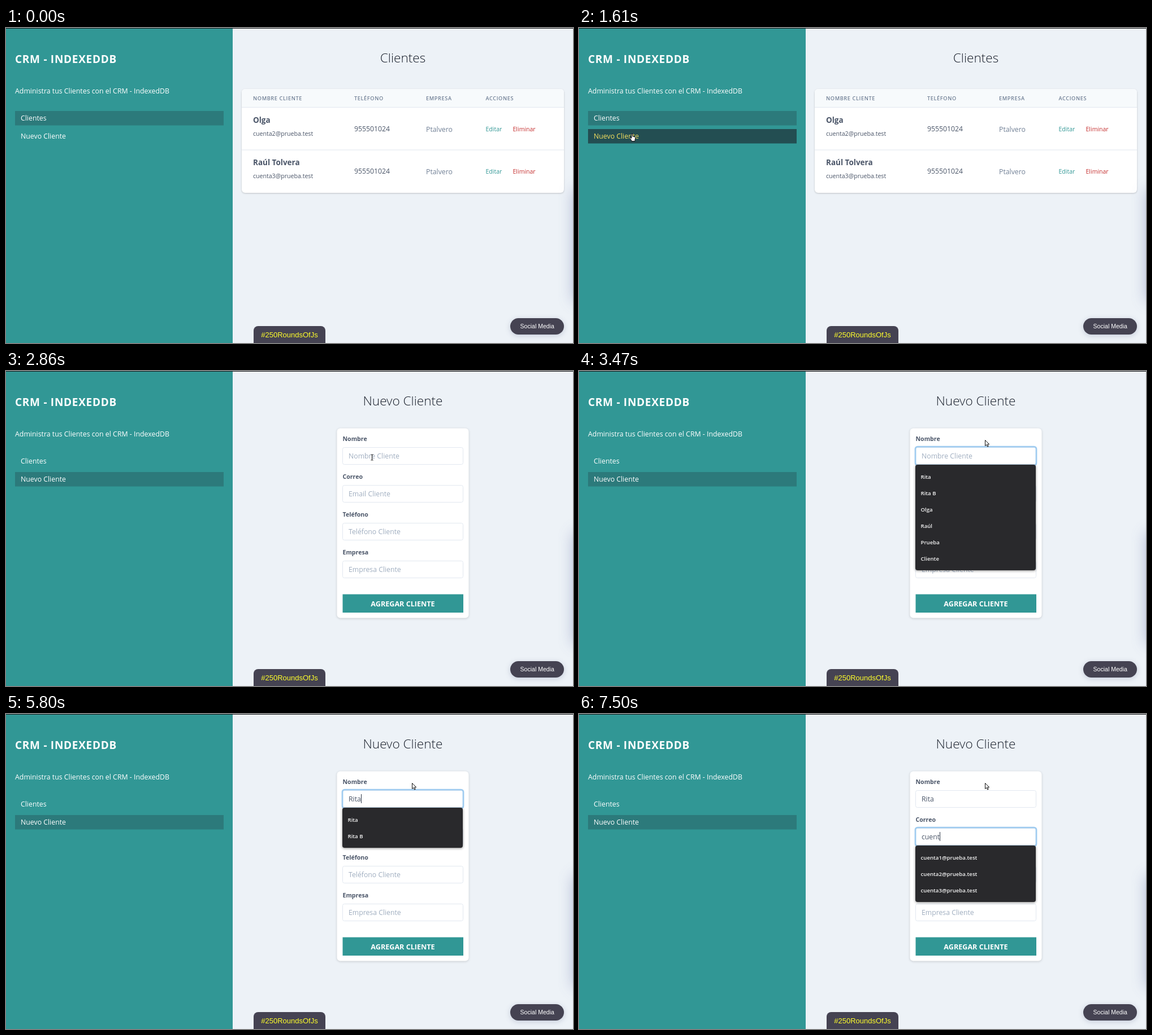
These frames come from a looping animation (1003 px wide and 558 px high, 8000 ms). An HTML page with a canvas:

```html
<!DOCTYPE html>
<html lang="es">
<head>
<meta charset="utf-8">
<title>CRM - IndexedDB</title>
<style>
  html, body { margin: 0; width: 100%; height: 100%; overflow: hidden; background: #edf2f7; }
  canvas { display: block; }
</style>
</head>
<body>
<canvas id="stage" width="1003" height="558"></canvas>
<script>
const ctx = document.getElementById('stage').getContext('2d');
const LOOP = 8000;
const SANS = '"Open Sans", "Noto Sans", sans-serif';
const ARIAL = '"Liberation Sans", Arial, sans-serif';
const TEAL = '#319795', TEAL_DARK = '#2c7a7b', TEAL_DEEP = '#234e52';
const INK = '#4a5568', GRAY = '#718096', PALE = '#a0aec0', LINE = '#e2e8f0', YELLOW = '#f6e05e';

const SITE = 'https://ptalverotila.github.io/CRM-Adm-practice/';
const FORM_OPENS = 2090;
const MENU = [
  { label: 'Clientes', y: 147, page: 'index.html' },
  { label: 'Nuevo Cliente', y: 179, page: 'nuevo-cliente.html' }
];
const CLIENTS = [
  { name: 'Olga', mail: 'cuenta2@prueba.test' },
  { name: 'Raúl Tolvera', mail: 'cuenta3@prueba.test' }
];
const FIELDS = [
  ['Nombre', 'Nombre Cliente'], ['Correo', 'Email Cliente'],
  ['Teléfono', 'Teléfono Cliente'], ['Empresa', 'Empresa Cliente']
];
const FIELD = { x: 595.5, y: 135, step: 67.1, w: 213, h: 31 };

const NAMES = ['Rita', 'Rita B', 'Olga', 'Raúl', 'Prueba', 'Cliente'];
const MAILS = [1, 2, 3, 4, 5, 6].map(n => (n < 4 ? 'cuenta' : 'cliente') + n + '@prueba.test');

// [time, field, typed text, suggestions, caret visible]
const TYPING = [
  [3010, 0, '', NAMES, true],
  [3470, 0, '', NAMES, false],
  [3780, 0, 'R', NAMES.slice(0, 2), true],
  [4010, 0, 'Ru', [], true],
  [4240, 0, 'Ru ', [], true],
  [4790, 0, 'Ru ', [], false],
  [5020, 0, 'R', NAMES.slice(0, 2), true],
  [5250, 0, 'Ri', NAMES.slice(0, 2), true],
  [5400, 0, 'Rit', NAMES.slice(0, 2), true],
  [5800, 0, 'Rita', NAMES.slice(0, 2), true],
  [6030, 1, '', [], true],
  [6580, 1, '', [], false],
  [6810, 1, 'c', MAILS, true],
  [7040, 1, 'cu', MAILS.slice(0, 3), true],
  [7190, 1, 'cue', MAILS.slice(0, 3), true],
  [7350, 1, 'cuen', MAILS.slice(0, 3), true],
  [7500, 1, 'cuent', MAILS.slice(0, 3), true]
];

// [time, x, y] of the pointer's hot spot
const PATH = [
  [450, 990, 552], [530, 977, 547], [680, 880, 520], [1070, 92, 297],
  [1220, 92, 270], [1376, 92, 200], [1610, 94, 187], [2000, 95, 188],
  [2090, 165, 184], [2240, 317, 164], [2860, 647, 153], [2930, 665, 146], [3090, 718, 122]
];
// [first, last, number of steps]
const BURSTS = [[450, 530, 2], [680, 1070, 6], [1220, 2000, 11], [2090, 2860, 11], [2930, 3090, 3]];

function stepTime(t) {
  let held = 0;
  for (const [from, to, count] of BURSTS) {
    if (t < from) break;
    const gap = (to - from) / (count - 1);
    held = from + gap * Math.min(count - 1, Math.floor((t - from + 5) / gap));
  }
  return held;
}

function pointerAt(t) {
  const s = stepTime(t);
  if (s < PATH[0][0]) return null;
  const next = PATH.findIndex(p => p[0] > s);
  if (next < 0) return { x: 718, y: 122 };
  const [t0, x0, y0] = PATH[next - 1], [t1, x1, y1] = PATH[next];
  const k = (s - t0) / (t1 - t0);
  return { x: Math.round(x0 + (x1 - x0) * k), y: Math.round(y0 + (y1 - y0) * k) };
}

function rect(x, y, w, h, color) {
  ctx.fillStyle = color;
  ctx.fillRect(x, y, w, h);
}

function box(x, y, w, h, radius, color) {
  ctx.beginPath();
  ctx.roundRect(x, y, w, h, radius);
  ctx.fillStyle = color;
  ctx.fill();
}

function outline(x, y, w, h, radius, color, width) {
  ctx.beginPath();
  ctx.roundRect(x, y, w, h, radius);
  ctx.strokeStyle = color;
  ctx.lineWidth = width;
  ctx.stroke();
}

function shadowed(color, blur, dy, draw) {
  ctx.save();
  ctx.shadowColor = color;
  ctx.shadowBlur = blur;
  ctx.shadowOffsetY = dy;
  draw();
  ctx.restore();
}

function text(str, x, y, size, color, { weight = 400, family = SANS, align = 'left', spacing = 0 } = {}) {
  ctx.font = `${weight} ${size}px ${family}`;
  ctx.letterSpacing = spacing + 'px';
  ctx.textAlign = align;
  ctx.fillStyle = color;
  ctx.fillText(str, x, y);
}

function drawSidebar(active, hovered) {
  rect(0, 0, 401, 558, TEAL);
  text('CRM - INDEXEDDB', 16, 61.5, 19, '#fff', { weight: 700, spacing: 0.72 });
  text('Administra tus Clientes con el CRM - IndexedDB', 16, 116, 12.35, '#fff');
  MENU.forEach((item, i) => {
    const over = i === hovered;
    if (over || i === active) rect(16, item.y, 369, 25.5, over && i === 1 ? TEAL_DEEP : TEAL_DARK);
    text(item.label, 26, item.y + 17.3, 12.3, over ? YELLOW : '#fff');
  });
}

function drawTitle(str) {
  text(str, 702, 61, 22.6, '#1a202c', { weight: 300, align: 'center' });
}

function drawClients() {
  drawTitle('Clientes');
  shadowed('rgba(0,0,0,0.2)', 3, 1, () => box(417, 108, 570, 184, 6, '#fff'));
  box(417, 108, 570, 33, [6, 6, 0, 0], '#f7fafc');
  rect(417, 140, 570, 1, LINE);
  rect(417, 215.5, 570, 1, LINE);
  const head = { weight: 600, spacing: 0.6 };
  [['NOMBRE CLIENTE', 437], ['TELÉFONO', 616], ['EMPRESA', 743], ['ACCIONES', 848.5]]
    .forEach(([label, x]) => text(label, x, 128, 9.2, GRAY, head));
  CLIENTS.forEach(({ name, mail }, i) => {
    const y = i * 75;
    text(name, 437, y + 168, 13.5, INK, { weight: 700 });
    text(mail, 437, y + 191, 10.6, INK);
    text('955501024', 616, y + 183.4, 12.25, INK);
    text('Ptalvero', 743, y + 184, 12.3, GRAY);
    text('Editar', 848.5, y + 183, 10.5, TEAL);
    text('Eliminar', 896.5, y + 183, 10.5, '#c53030');
  });
}

function drawForm(typing) {
  const [, focus, typed, options, caret] = typing || [0, -1, '', [], false];
  drawTitle('Nuevo Cliente');
  shadowed('rgba(0,0,0,0.17)', 4, 1, () => box(585.5, 101.5, 233, 336, 6, '#fff'));
  FIELDS.forEach(([label, hint], i) => {
    const { x, w, h } = FIELD, y = FIELD.y + Math.round(i * FIELD.step);
    const value = i === focus ? typed : i < focus ? 'Rita' : '';
    text(label, 595.5, y - 10.6, 10.6, INK, { weight: 700 });
    outline(x, y + 0.5, w, h - 1, 3, LINE, 1);
    if (i === focus) outline(x - 0.5, y - 0.9, w + 1, h + 1.8, 4, '#a0ccf0', 2.8);
    text(value || hint, 606, y + 20.3, 12.25, value ? INK : PALE);
    if (i === focus && caret) {
      const end = 606 + (value ? ctx.measureText(value).width : 0);
      rect(Math.round(end), y + 7, 1, 16, '#2d3748');
    }
  });
  rect(595.5, 395.5, 213.5, 32.5, TEAL);
  text('AGREGAR CLIENTE', 702, 416.6, 12.6, '#fff', { weight: 700, align: 'center' });
  if (options.length) drawOptions(FIELD.y + Math.round(focus * FIELD.step) + 31, options);
}

function drawOptions(y, options) {
  shadowed('rgba(0,0,0,0.45)', 4, 1, () => box(595, y, 213, 13 + 29 * options.length, 4, '#29292c'));
  options.forEach((option, i) => text(option, 604.5, y + 24.7 + 29 * i, 9.65, '#f4f4f4', { weight: 600 }));
}

function drawOverlays(link) {
  shadowed('rgba(90,105,165,0.42)', 26, 0, () => rect(1004, 287, 60, 196, '#fff'));
  box(438, 528, 127, 34, [8, 8, 0, 0], '#454352');
  text('#250RoundsOfJs', 501.5, 547.5, 13, '#ffff2b', { family: ARIAL, align: 'center' });
  shadowed('rgba(80,90,130,0.25)', 10, 2, () => box(892, 514, 95, 29, 14.5, '#454352'));
  text('Social Media', 939.7, 532.3, 10.56, '#fff', { family: ARIAL, align: 'center' });
  if (link) {
    const url = SITE + link;
    ctx.font = `400 9.3px ${SANS}`;
    ctx.letterSpacing = '0px';
    box(0, 541, ctx.measureText(url).width + 9, 17, [0, 3, 0, 0], '#303336');
    text(url, 3.5, 553, 9.3, '#c9cccf');
  }
  rect(0, 0, 1003, 1, '#16181a');
}

const SHAPES = {
  arrow: new Path2D('M.5 .5V10.6L2.9 8.4L4.5 12L6.2 11.3L4.6 7.8H7.7Z'),
  hand: new Path2D('M-1 1Q0 -.6 1 1V5L5 6Q6 6.3 5.8 8L5 11V13.5H-1.2V12L-3.8 8.4Q-4 6.6 -2.4 7.2L-1 8.4Z'),
  beam: new Path2D('M-2 -5H-.5L0 -4.5L.5 -5H2M0 -4.5V4.5M-2 5H-.5L0 4.5L.5 5H2')
};

function drawPointer({ x, y }, kind) {
  ctx.save();
  ctx.translate(x + (kind === 'beam' ? 0.5 : 0), y);
  ctx.lineWidth = 1;
  ctx.lineJoin = 'round';
  ctx.strokeStyle = '#111';
  if (kind !== 'beam') {
    ctx.fillStyle = '#fff';
    ctx.fill(SHAPES[kind]);
  }
  ctx.stroke(SHAPES[kind]);
  ctx.restore();
}

function inside(p, x, y, w, h) {
  return p.x >= x && p.x <= x + w && p.y >= y && p.y <= y + h;
}

function draw(t) {
  const pointer = pointerAt(t);
  const onForm = t >= FORM_OPENS;
  const hovered = pointer ? MENU.findIndex(item => inside(pointer, 16, item.y, 369, 25.5)) : -1;
  const inField = onForm && pointer && inside(pointer, FIELD.x, FIELD.y, FIELD.w, FIELD.h);
  const typing = TYPING.filter(step => step[0] <= t).pop();
  let link = '';
  if (t >= 1760 && t < FORM_OPENS) link = MENU[1].page;
  else if (onForm && t < 2470) link = MENU[t < 2240 ? 1 : 0].page;

  ctx.clearRect(0, 0, 1003, 558);
  rect(0, 0, 1003, 558, '#edf2f7');
  drawSidebar(onForm ? 1 : 0, hovered);
  if (onForm) drawForm(typing); else drawClients();
  drawOverlays(link);
  if (pointer) drawPointer(pointer, hovered >= 0 ? 'hand' : inField ? 'beam' : 'arrow');
}

const start = performance.now();
function tick() {
  draw((performance.now() - start) % LOOP);
  requestAnimationFrame(tick);
}
tick();
</script>
</body>
</html>
```
